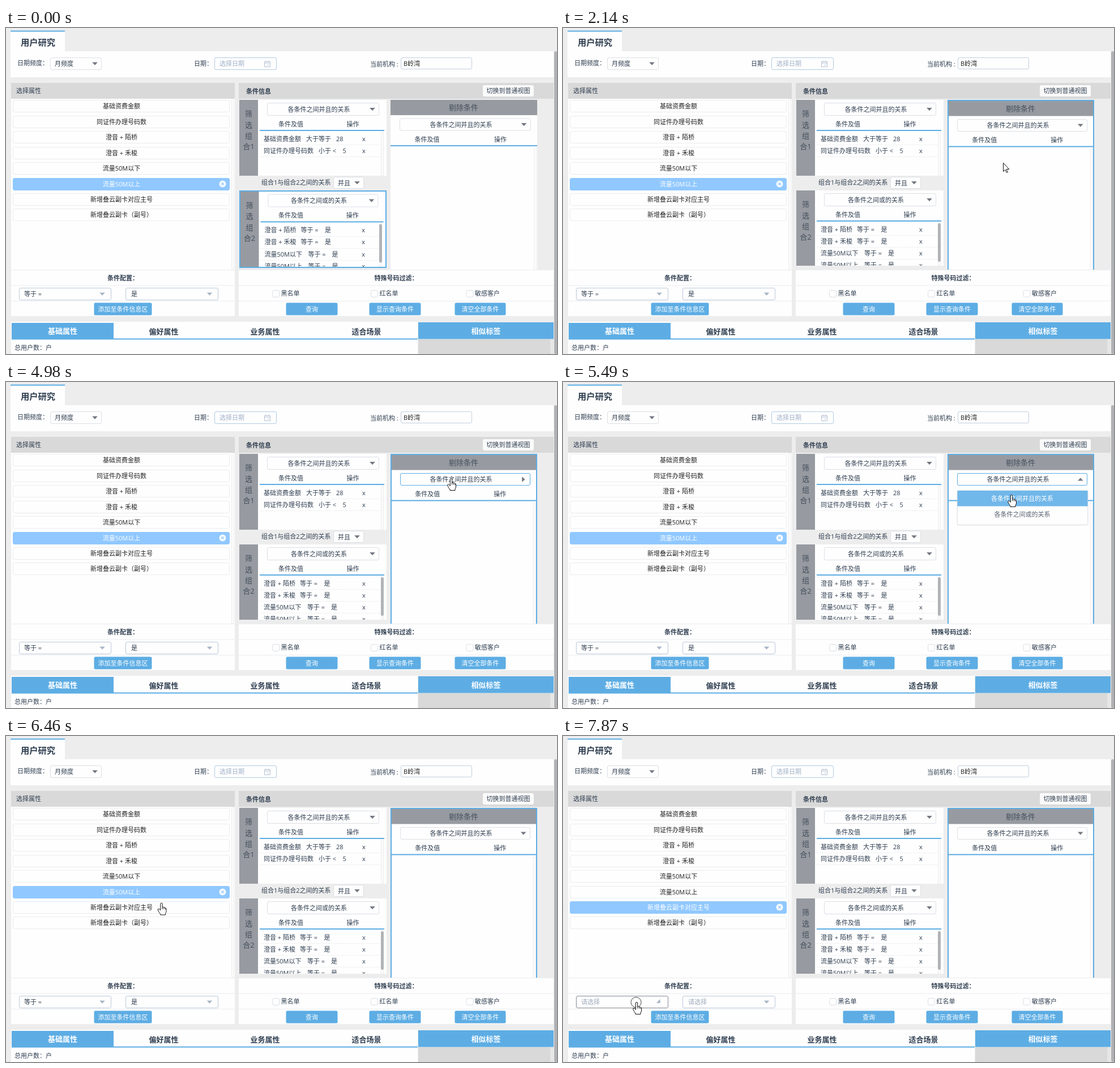
These frames come from a looping animation (973 px wide and 576 px high, 8 s). An HTML page:

```html
<!DOCTYPE html>
<html lang="zh-CN">
<head>
<meta charset="utf-8">
<title>用户研究</title>
<style>
html, body { margin: 0; width: 100%; height: 100%; overflow: hidden; background: #ededed; }
svg { display: block; width: 973px; height: 576px; }
text { font-family: "Open Sans", "Noto Sans CJK SC", "Noto Sans CJK", sans-serif; white-space: pre; }
</style>
</head>
<body>
<svg id="stage" viewBox="0 0 973 576" xmlns="http://www.w3.org/2000/svg"></svg>
<script>
const BLUE = '#5dade4', INK = '#2f3e50', GREY = '#979ba1', LINE = '#ebecef', EDGE = '#dcdfe6';
const LOOP = 8000;

// Text is placed by its visual centre line.
const text = (s, x, y, o = {}) => {
  const { size = 11, fill = INK, at = 'start', bold = 0, id = '' } = o;
  return `<text ${id && `id="${id}"`} x="${x}" y="${y + size * 0.38}" font-size="${size}" fill="${fill}" ` +
    `text-anchor="${at}" font-weight="${bold ? 700 : 400}">${s}</text>`;
};
const mid = (s, x, y, o = {}) => text(s, x, y, { at: 'middle', ...o });
const box = (x1, y1, x2, y2, fill, extra = '') =>
  `<rect x="${x1}" y="${y1}" width="${x2 - x1}" height="${y2 - y1}" fill="${fill}" ${extra}/>`;
const frame = (x1, y1, x2, y2, stroke = EDGE, id = '', fill = '#fefefe') =>
  box(x1 + 0.5, y1 + 0.5, x2 - 0.5, y2 - 0.5, fill, `rx="2.5" stroke="${stroke}" ${id && `id="${id}"`}`);
const rule = (x1, x2, y, color = LINE, extra = '') =>
  `<path d="M${x1} ${y}H${x2}" stroke="${color}" ${extra}/>`;
const caret = (x, y, fill = '#737880', id = '') =>
  `<g transform="translate(${x} ${y})"><path ${id && `id="${id}"`} d="M-4.8 -2.6H4.8L0 2.8Z" fill="${fill}"/></g>`;
const button = (s, x1, x2) =>
  box(x1 + 0.5, 485.5, x2 - 0.5, 507.5, BLUE, 'rx="2.5"') + mid(s, (x1 + x2) / 2, 496.5, { fill: '#fff' });
const sideLabel = (n, x, y) =>
  ['筛', '选', '组', '合' + n].map((c, i) => mid(c, x, y + i * 19.3, { size: 13, fill: '#454e5c' })).join('');

function header() {
  return box(8, 5, 104, 42, '#fefefe') + box(8, 4.5, 104, 6.5, BLUE) +
    mid('用户研究', 56.5, 25.5, { size: 15.3, bold: 1 }) +
    box(8, 41, 967, 87, '#fefefe') +
    text('日期频度：', 20, 62) + frame(78, 52, 169, 74) + text('月频度', 86, 63) + caret(157, 63) +
    text('日期：', 332, 63) + frame(368, 52, 478, 74, '#b3cbe2') +
    text('选择日期', 377, 63, { fill: '#9fb0c8' }) +
    `<path d="M456.5 59.5H466.5V68.5H456.5ZM456.5 62H466.5M459 57.5V60M464 57.5V60M461.5 65.5H464.5" fill="none" stroke="#b4c0d2"/>` +
    text('当前机构 :', 643, 63.5) + frame(697, 52, 823, 73, '#c3d0df') + text('B岭湾', 702, 63, { fill: '#222' });
}

const items = ['基础资费金额', '同证件办理号码数', '澄音 + 陌桥', '澄音 + 禾梭', '流量50M以下', '流量50M以上',
  '新增叠云副卡对应主号', '新增叠云副卡（副号）'];
const rowTop = i => Math.floor(127.8 + i * 27.45);
const rowY = i => rowTop(i) + 11;

function leftPanel() {
  return box(9, 97, 404, 125, '#d9d9d9') + text('选择属性', 18, 111) +
    box(9, 125, 404, 509, '#fefefe') +
    box(398.5, 125.5, 402.5, 426, '#fcfcfc', 'stroke="#eeeeee"') +
    items.map((s, i) => frame(12, rowTop(i), 395, rowTop(i) + 22, LINE, 'row' + i) +
      mid(s, 204, rowY(i), { fill: '#222', id: 'item' + i })).join('') +
    `<g id="close"><circle r="6" fill="#f4faff"/><path d="M-2.2 -2.2L2.2 2.2M2.2 -2.2L-2.2 2.2" stroke="#8fc6fc" stroke-width="1.2"/></g>` +
    rule(9, 404, 427.5) + rule(9, 404, 455) + rule(9, 404, 482.5) +
    text('条件配置：', 179, 442, { bold: 1 }) +
    frame(23, 459, 186, 481, '#bccadb', 'leftEdge') + text('', 32, 470, { id: 'pickA' }) + caret(170, 470, '#aab6c6', 'leftCaret') +
    frame(211, 459, 375, 481, '#bccadb') + text('', 221, 470, { id: 'pickB' }) + caret(359.5, 470, '#aab6c6') +
    button('添加至条件信息区', 155, 258);
}

// One rule group; a selected one is inset by its border.
function group(n, top, bottom, rel, rows, sel, thumb) {
  const d = sel ? 1.5 : 0, y = top + d, x = 412 + d, clip = `clip${n}${sel}`;
  const end = bottom - (sel ? 2 : 0);
  let s = box(412, top, 672, bottom, '#fefefe') + box(x, y, x + 33, end, GREY) + sideLabel(n, x + 16.5, y + 24.5) +
    frame(461 + d, y + 5, 659 - d, y + 28) + mid(rel, 552.5, y + 16.5) + caret(647 - d, y + 16.5) +
    mid('条件及值', 503, y + 42.5) + mid('操作', 612.5 - d / 2, y + 42.5) +
    rule(448 + d, 668 - d, y + 54, BLUE, 'stroke-width="2"') +
    `<clipPath id="${clip}">${box(445, y, 672, end, '#000')}</clipPath><g clip-path="url(#${clip})">`;
  rows.forEach(([name, op, val, opX, valX], i) => {
    const ry = y + 68.5 + i * 21.2;
    s += text(name, 455 + d, ry) + text(op, opX + d, ry) + text(val, valX + d, ry) + mid('x', 632 - d / 2, ry) +
      rule(448 + d, 662 - d, Math.round(ry + 10.5) + 0.5, LINE, 'stroke-dasharray="2 1"');
  });
  s += box(662.5 - 2 * d, y + 57, 666.5 - 2 * d, end, '#fbfbfb', 'stroke="#eeeeee"');
  if (thumb) s += box(662 - 2 * d, y + 58, 667 - 2 * d, y + 126, '#b1b3b6', 'rx="2.5"');
  s += '</g>';
  if (sel) s += box(413, top + 1, 671, bottom - 1, 'none', `stroke="${BLUE}" stroke-width="2"`);
  return s;
}

function excludePanel(sel) {
  const d = sel ? 1.5 : 0, l = 679 + d, r = 938 - d;
  let s = box(679, 127, 938, 427, '#fefefe') + box(l, 127 + d, r, 154 + d, GREY) +
    mid('剔除条件', 808, 140.5 + d, { size: 13, fill: '#454e5c' }) +
    frame(695 + d / 1.5, 159.5 + d, 927 - d / 1.5, 181.5 + d, EDGE, 'edge' + sel) +
    mid('各条件之间并且的关系', 803.5, 170.5 + d) + caret(914.5 - d / 2, 170.5 + d, '#737880', 'turn' + sel) +
    mid('条件及值', 743.5 + d / 2, 196.5 + d) + mid('操作', 873 - d / 2, 196.5 + d) +
    rule(l, r, 208 + d, BLUE, 'stroke-width="2"') +
    box(932.5 - d, 212 + d, 936.5 - d, 428, '#fcfcfc', 'stroke="#eeeeee"');
  if (sel) s += `<path d="M680 427V128H937V427" fill="none" stroke="${BLUE}" stroke-width="2"/>`;
  return s;
}

const rows1 = [['基础资费金额', '大于等于', '28', 530, 583], ['同证件办理号码数', '小于 <', '5', 552, 594.5]];
const rows2 = [['澄音 + 陌桥', '等于 =', '是', 519, 561.5], ['澄音 + 禾梭', '等于 =', '是', 519, 561.5],
  ['流量50M以下', '等于 =', '是', 532, 574], ['流量50M以上', '等于 =', '是', 532, 574]];
const OR = '各条件之间或的关系', AND = '各条件之间并且的关系';

function rightPanel() {
  const second = sel => `<g id="second${sel}">${group(2, 287, sel ? 424 : 420, OR, rows2, sel, 1)}</g>`;
  const third = sel => `<g id="third${sel}">${excludePanel(sel)}</g>`;
  const check = (s, x) => frame(x, 463, x + 13, 476) + text(s, x + 15.5, 469);
  return box(411, 97, 967, 125, '#d9d9d9') + text('条件信息', 424, 112, { bold: 1 }) +
    box(842, 101, 932, 121, '#fafafa', 'rx="3"') + mid('切换到普通视图', 887, 111) +
    group(1, 127, 261, AND, rows1, 0, 0) +
    text('组合1与组合2之间的关系', 451, 273) + frame(578, 263, 632, 284) + text('并且', 586, 273.5) + caret(620, 273.5) +
    second(0) + second(1) + third(0) + third(1) +
    box(411, 427, 967, 509, '#fefefe') + rule(411, 967, 427.5) + rule(411, 967, 455) + rule(411, 967, 482.5) +
    text('特殊号码过滤：', 650.5, 442, { bold: 1 }) +
    check('黑名单', 470) + check('红名单', 644) + check('敏感客户', 812.5) +
    button('查询', 494, 586) + button('显示查询条件', 641, 733) + button('清空全部条件', 792, 883);
}

function footer() {
  const tab = (s, x, y = 536, fill = INK) => mid(s, x, y, { size: 13, bold: 1, fill });
  return box(9, 519, 727, 576, '#fefefe') + box(10, 521, 190, 549, BLUE) + box(10, 548.5, 727, 550.5, BLUE) +
    tab('基础属性', 100, 535.5, '#fff') + tab('偏好属性', 278.5) + tab('业务属性', 457.5) + tab('适合场景', 636.5) +
    text('总用户数：户', 15, 565) +
    box(728, 550, 967, 576, '#d9d9d9') + box(961, 550, 967, 576, '#e6e6e6') +
    box(728, 520, 967, 549.5, BLUE) + tab('相似标签', 847.5, 535, '#fff') +
    box(968, 41, 973, 576, '#b0b2b5', 'rx="2.5"');
}

function overlay() {
  return `<g id="drop">` + box(695, 191.5, 928, 254, '#000', 'rx="3" opacity=".05"') +
    frame(696, 191, 927, 252.5, '#e4e7ed') + box(696.5, 192, 926.5, 219.5, '#70b7ea') +
    mid(AND, 811, 206, { fill: '#fff' }) + mid(OR, 811, 234, { fill: '#5a6270' }) + '</g>' +
    `<g id="cursor" stroke="#111" fill="#fff" stroke-linejoin="round">` +
    `<circle id="ring" cx="-1" cy=".5" r="9" fill="none" stroke="#444"/>` +
    `<path id="arrow" d="M.5 .5V15.6L4 12.4L6.3 17.6L8.4 16.7L6.1 11.5H10.8Z"/>` +
    `<path id="hand" d="M-1.7 12V2Q-1.7 .5 0 .5T1.7 2V8Q3.6 6.8 4.5 8.6Q6.2 7.6 7 9.6Q8.5 9.2 8.5 11.2V15Q8.5 17 7 19V21.5H-2V20` +
    `Q-4.5 17 -6 13.5Q-7 11 -5 10.8Q-3.5 10.8 -1.7 13.5ZM1.7 8V11.5M4.5 8.8V11.5M7 9.8V12"/></g>`;
}

const stage = document.getElementById('stage');
stage.innerHTML = header() + leftPanel() + rightPanel() + footer() + overlay();
const $ = id => document.getElementById(id);
const set = (id, attrs) => { for (const k in attrs) $(id).setAttribute(k, attrs[k]); };
const show = (id, on) => set(id, { display: on ? 'inline' : 'none' });

const arrow = (x, y) => ({ cur: 'arrow', x, y });
const hand = (x, y) => ({ cur: 'hand', x, y });
const HOVER = '#b9bec8';
const steps = [
  [0, { cur: '', x: 0, y: 0, second: 1, third: 0, row: 5, hover: -1, picked: 1, drop: 0, turn: 0, edge: EDGE, press: 0 }],
  [1460, { ...arrow(806, 236), third: 1 }],
  [1580, arrow(784, 238)],
  [1730, arrow(777, 238)],
  [2140, { second: 0 }],
  [4470, arrow(779, 219)],
  [4590, arrow(786, 174)],
  [4740, { ...hand(788, 172), edge: HOVER }],
  [4860, hand(786, 170)],
  [4980, { edge: BLUE, turn: 0.5 }],
  [5100, { drop: 0.3, turn: 1 }],
  [5220, { drop: 0.65 }],
  [5340, { drop: 0.92 }],
  [5490, { ...hand(792, 199), drop: 1 }],
  [5640, { drop: 0.5, turn: 0.5 }],
  [5760, { ...hand(792, 172), drop: 0, turn: 0 }],
  [5910, { edge: HOVER }],
  [6190, hand(772.5, 172)],
  [6340, { ...arrow(452, 268), edge: EDGE }],
  [6460, hand(274.5, 294.5)],
  [6580, { ...hand(273.5, 297), hover: 6 }],
  [6990, { row: 6, hover: -1, picked: 0 }],
  [7420, hand(243.5, 327)],
  [7570, arrow(145, 439)],
  [7720, hand(131.5, 464)],
  [7870, { ...hand(130, 470), press: 1 }]
];

function draw(t) {
  const s = Object.assign({}, ...steps.filter(([at]) => at <= t).map(([, v]) => v));
  for (const k of [0, 1]) {
    show('second' + k, s.second === k);
    show('third' + k, s.third === k);
  }
  items.forEach((_, i) => {
    const on = i === s.row, hov = i === s.hover;
    set('row' + i, { fill: on ? '#90c8ff' : hov ? '#f6faff' : '#fefefe', stroke: on ? '#90c8ff' : hov ? '#d3e6f8' : LINE });
    set('item' + i, { fill: on ? '#fff' : '#222' });
  });
  set('close', { transform: `translate(382.5 ${rowY(s.row) - 0.5})` });
  const ink = s.picked ? INK : '#9fabbc';
  $('pickA').textContent = s.picked ? '等于 =' : '请选择';
  $('pickB').textContent = s.picked ? '是' : '请选择';
  set('pickA', { fill: ink });
  set('pickB', { fill: ink });
  set('edge1', { stroke: s.edge });
  set('turn1', { transform: `rotate(${-180 * s.turn})` });
  set('leftEdge', { stroke: s.press ? '#858b95' : '#bccadb' });
  set('leftCaret', { transform: `rotate(${s.press ? -50 : 0})` });
  show('drop', s.drop > 0);
  set('drop', { opacity: s.drop, transform: `translate(0 191) scale(1 ${s.drop}) translate(0 -191)` });
  show('arrow', s.cur === 'arrow');
  show('hand', s.cur === 'hand');
  show('ring', s.press);
  set('cursor', { transform: `translate(${s.x} ${s.y})` });
}

const start = performance.now();
function tick() {
  draw((performance.now() - start) % LOOP);
  requestAnimationFrame(tick);
}
tick();
</script>
</body>
</html>
```
